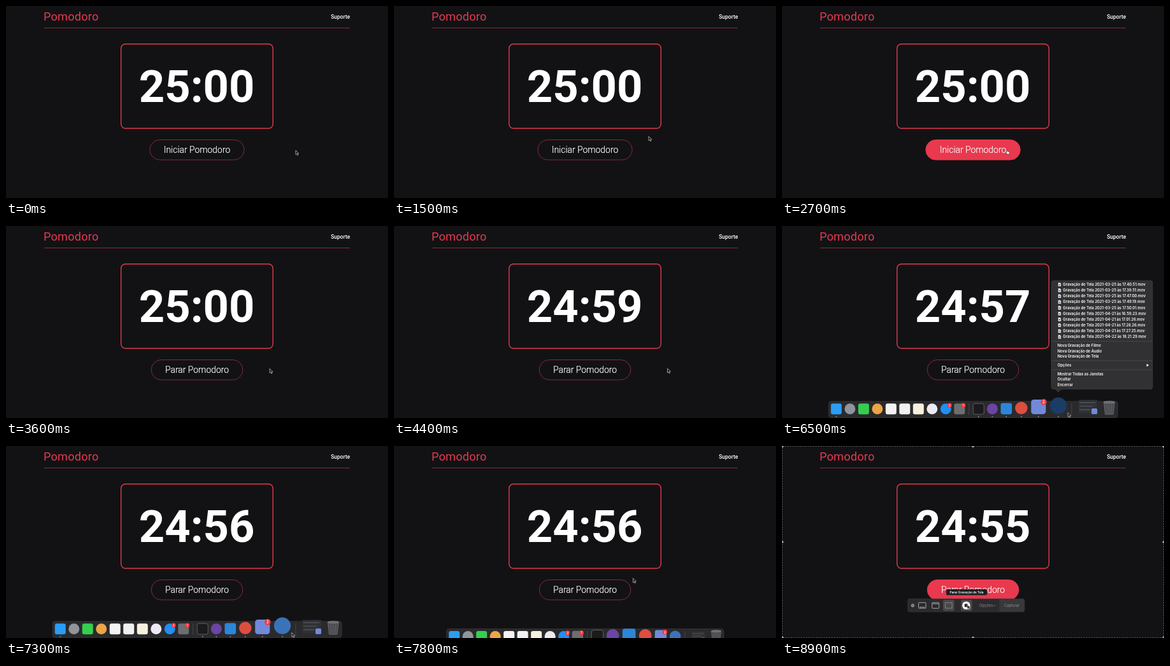
An HTML page for the animation above (9 s loop, 600x302 px).

```html
<!DOCTYPE html>
<html lang="pt">
<head>
<meta charset="utf-8">
<title>Pomodoro</title>
<style>
  html, body { margin: 0; width: 100%; height: 100%; overflow: hidden; background: #121214; }
  svg { display: block; width: 100vw; height: 100vh; }
  text { fill: #fff; font-family: Roboto, Arial, sans-serif; }
  .ui text { font: 600 5.83px Inter, Roboto, sans-serif; }
  .ui .tip { font-size: 5.6px; font-weight: 400; }
  .ui .small { font-size: 4.75px; }
  .ui .badge { font-size: 4.6px; }
  .ui .dim { fill: #8b8b8d; font-weight: 400; }
  .mid { text-anchor: middle; }
</style>
</head>
<body>
<svg id="stage" viewBox="0 0 600 302" xmlns="http://www.w3.org/2000/svg">
  <rect width="600" height="302" fill="#121214"/>
  <text x="59" y="22.9" font-size="18" letter-spacing=".3" style="fill:#e63950">Pomodoro</text>
  <text x="540.3" y="19.8" font-size="8.5" font-weight="500" text-anchor="end">Suporte</text>
  <path d="M60 34.5H540" stroke="#862a38"/>
  <rect x="180.7" y="59.7" width="238.6" height="132.8" rx="7" fill="none" stroke="#e03a4e" stroke-width="1.4"/>
  <text id="clock" class="mid" x="299.6" y="150.5" font-size="70.6" font-weight="700"></text>
  <rect id="button" y="210.5" height="31.5" rx="15.7" fill="#e8394f"/>
  <text id="label" class="mid" x="300" y="231.2" font-size="13.9" font-weight="300" stroke="#fff" stroke-width=".2"></text>

  <g id="dock" class="ui"></g>

  <g id="tooltip" class="ui">
    <path d="M410.5 252.5h54a2 2 0 0 1 2 2v7a2 2 0 0 1-2 2H440l-2.500 2.800-2.500-2.800h-24.500a2 2 0 0 1-2-2v-7a2 2 0 0 1 2-2z" fill="#2a2a2c" stroke="#505052" stroke-width=".5"/>
    <text class="mid tip" x="437.5" y="260">FieldReel Viewer</text>
  </g>

  <g id="menu" class="ui">
    <path d="M426 86h153a3 3 0 0 1 3 3v164.5a3 3 0 0 1-3 3H439l-5 4.500-5-4.500h-3a3 3 0 0 1-3-3V89a3 3 0 0 1 3-3z" fill="#313133" stroke="#4c4c4e" stroke-width=".5"/>
    <path d="M572.7 216.8l3.600 2.200-3.600 2.200z" fill="#fff"/>
  </g>

  <g id="capture" class="ui">
    <rect x=".5" y=".5" width="599" height="301" fill="none" stroke="#8a8a8c" stroke-width=".7" stroke-dasharray="2 2"/>
    <g id="handles" fill="#a5a5a7"></g>
    <rect x="197.5" y="240.3" width="183.5" height="20.7" rx="3" fill="#2b2b2d" stroke="#3d3d3f" stroke-width=".5"/>
    <rect x="341.5" y="240.5" width="39.3" height="20.3" rx="2.5" fill="#38383a"/>
    <rect x="253" y="242" width="17.5" height="17.5" rx="2" fill="#49494b"/>
    <rect x="281" y="242" width="17.5" height="17.5" rx="2" fill="#49494b"/>
    <circle cx="205.3" cy="250.8" r="2.6" fill="#98989a"/>
    <path d="M204.3 249.8l2 2m0-2l-2 2" stroke="#2b2b2d" stroke-width=".6"/>
    <g fill="none" stroke="#b4b4b6" stroke-width=".9">
      <rect x="214.5" y="246.3" width="11.5" height="9" rx="1"/>
      <path d="M216 253.5h8.500"/>
      <rect x="235.7" y="246.3" width="11" height="9" rx="1"/>
      <path d="M236 248.2h10.500"/>
      <rect x="256.5" y="246.5" width="10.5" height="8.6" stroke-dasharray="1.5 1"/>
    </g>
    <circle cx="289.3" cy="250.8" r="6.3" fill="#fff"/>
    <rect x="286.7" y="248.3" width="5" height="5" rx=".8" fill="#29292b"/>
    <text class="dim" x="310" y="252.9">Opções</text>
    <path d="M332.3 250.3l1.600 1.600 1.600-1.600" fill="none" stroke="#8b8b8d" stroke-width=".7"/>
    <text class="mid dim" x="361" y="252.9">Capturar</text>
    <rect x="258" y="225.5" width="64" height="9" rx="1.8" fill="#1d1d1f" stroke="#414143" stroke-width=".5"/>
    <text class="mid small" x="290" y="231.7">Parar Gravação de Tela</text>
  </g>

  <path id="arrow" d="M0 0v6.800l1.600-1.500 1.100 2.500 1.200-.5-1.100-2.400h2.100z" fill="#111" stroke="#ddd" stroke-width=".65"/>
  <path id="hand" d="M1 .3q.7-.4 1 .4l.5 2 2.400.6q1 .3.8 1.300l-.4 2.400h-3L.2 4.700q-.4-.8.5-.6l.7.3z" fill="#fff" stroke="#222" stroke-width=".5"/>
</svg>
<script>
const LOOP = 9000, CLICK = 3100, MENU_OPEN = 6300, MENU_SHUT = 7300, CAPTURE = 8300;
const $ = id => document.getElementById(id);
const set = (el, attrs) => { for (const k in attrs) el.setAttribute(k, attrs[k]); return el; };
const add = (parent, tag, attrs = {}, text = '') => {
  const el = set(document.createElementNS('http://www.w3.org/2000/svg', tag), attrs);
  el.textContent = text;
  return parent.appendChild(el);
};
const show = (el, on) => el.setAttribute('visibility', on ? 'visible' : 'hidden');
const within = (t, a, b) => t >= a && t < b;
const progress = (t, a, b) => Math.min(1, Math.max(0, (t - a) / (b - a)));
const smooth = p => p * p * (3 - 2 * p);

// Pointer moves: from, until, x, y
const MOVES = [
  [100, 900, 400, 205], [2100, 2600, 351.5, 226], [CLICK, 3800, 429.5, 224], [5100, 5500, 443, 303],
  [6250, 6450, 449, 293.5], [7400, 7800, 375.5, 208], [7800, 8500, 291, 249.5]
];
function pointer(t) {
  let x = 455, y = 227;
  for (const [from, until, toX, toY] of MOVES) {
    const p = smooth(progress(t, from, until));
    x += (toX - x) * p;
    y += (toY - y) * p;
  }
  return [x, y];
}

const buttonWidth = t => t < CLICK ? 148.4 : 143.6;
function overButton(t) {
  const [x, y] = pointer(t);
  return Math.abs(x - 300) < buttonWidth(t) / 2 && Math.abs(y - 226.2) < 15.8;
}
// The fill fades over 200 ms and stays as it was once the capture bar covers the page.
function hoverLevel(t) {
  const now = Math.min(t, CAPTURE), steps = 20;
  let sum = 0;
  for (let i = 0; i < steps; i++) sum += overButton(now - i * 200 / steps);
  return sum / steps;
}

// Dock icons: colour, round, badge
const ICONS = [
  ['#2a9df4'], ['#8f959b', 1], ['#35cf50'], ['#eda447', 1], ['#f4f2f2'], ['#f1f1f1'], ['#f6f1de'],
  ['#eeeaf3', 1], ['#1f8ff0', 1, '2'], ['#6c6e71', 0, '1'], ['#1b1b1d'], ['#6b44a4', 1],
  ['#2c86d8'], ['#dc4e40', 1], ['#7289da', 0, '2'], ['#3b73b9', 1]
];
const CELL = 21.5, WIDE = 34, GAP = 8.5, DEPTH = 30;

const dock = $('dock');
const shelf = add(dock, 'rect', { height: 25.7, rx: 4, fill: '#2a2a2d', stroke: '#434346', 'stroke-width': .5 });
const slots = ICONS.map(([fill, round, badge], i) => {
  const g = add(dock, 'g');
  add(g, 'rect', { x: -8.5, y: -17.5, width: 17, height: 17, rx: round ? 8.5 : 3.2, fill });
  if (badge) {
    add(g, 'circle', { cx: 6, cy: -14.6, r: 3.5, fill: '#f03a3e' });
    add(g, 'text', { x: 6, y: -12.9, class: 'mid badge' }, badge);
  }
  const dot = i === 0 || i > 9 ? add(dock, 'circle', { r: .8, fill: '#c8c8ca' }) : null;
  return { g, dot, base: CELL };
});
const player = slots[15].g.firstChild;
set(slots[10].g.firstChild, { stroke: '#77777a', 'stroke-width': .7 });

const shot = add(dock, 'g');
add(shot, 'rect', { x: -10.5, y: -16.5, width: 21, height: 15, fill: '#2f3135' });
add(shot, 'path', { d: 'M-9.5-13.5h18M-9.5-9.5h15M-9.5-5.5h12', stroke: '#505359' });
add(shot, 'rect', { x: 4, y: -7, width: 6.5, height: 6.5, rx: 1.3, fill: '#7289da' });
const bin = add(dock, 'g');
add(bin, 'path', { d: 'M-7.5-17.5h15l-2 17h-11z', fill: '#4b4d50', stroke: '#7e8083', 'stroke-width': .6 });
add(bin, 'ellipse', { cy: -17.3, rx: 7.6, ry: 1.5, fill: '#67696c', stroke: '#9a9c9f', 'stroke-width': .5 });
add(bin, 'path', { d: 'M-3.5-14l1 12M0-14v12M3.5-14l-1 12', stroke: '#66686b', 'stroke-width': .6 });
slots.push({ g: shot, base: WIDE }, { g: bin, base: CELL });
for (const i of [10, 16]) slots[i].divider = add(dock, 'path', { stroke: '#5a5a5d', 'stroke-width': .6 });

// Lays the cells out around the middle of the stage and returns their centres.
function layOut(widths) {
  const total = widths.reduce((a, b) => a + b) + 2 * GAP;
  let x = 300.3 - total / 2;
  const centres = widths.map((w, i) => {
    if (slots[i].divider) x += GAP;
    x += w;
    return x - w / 2;
  });
  return { total, centres };
}
const rest = layOut(slots.map(s => s.base)).centres;

function drawDock(t) {
  const rise = 1 - (1 - progress(t, 5350, 5850)) ** 2;
  const level = rise - progress(t, 7550, 7950) ** 2;
  dock.style.display = level > 0 ? '' : 'none';
  if (level <= 0) return;
  const drop = DEPTH * (1 - level);
  const focus = pointer(t)[0] - 6;
  const extra = rest.map(x => 12.3 * level ** 2 * Math.exp(-(((x - focus) / 45) ** 2)));
  const { total, centres } = layOut(slots.map((s, i) => s.base + extra[i]));
  set(shelf, { x: 299 - total / 2, y: 275.7 + drop, width: total + 2.6 });
  slots.forEach(({ g, dot, divider, base }, i) => {
    const x = centres[i];
    set(g, { transform: `translate(${x} ${296.7 + drop}) scale(${1 + extra[i] / CELL})` });
    if (dot) set(dot, { cx: x, cy: 299.7 + drop });
    if (divider) set(divider, { d: `M${x - (base + extra[i] + GAP) / 2} ${279 + drop}v18` });
  });
  player.setAttribute('fill', within(t, MENU_OPEN, MENU_SHUT) ? '#1a3c66' : '#3b73b9');
}

const FILES = [
  '03-25 às 17.40.51', '03-25 às 17.39.51', '03-25 às 17.47.00', '03-25 às 17.49.19', '03-25 às 17.50.01',
  '04-21 às 16.59.23', '04-21 às 17.01.26', '04-21 às 17.26.26', '04-21 às 17.27.25', '04-22 às 18.21.29'
].map(stamp => `Gravação de Tela 2021-${stamp}.mov`);
const SECTIONS = [
  FILES, ['Nova Gravação de Filme', 'Nova Gravação de Áudio', 'Nova Gravação de Tela'],
  ['Opções'], ['Mostrar Todas as Janelas', 'Ocultar', 'Encerrar']
];
function buildMenu(menu) {
  let y = 85;
  for (const section of SECTIONS) {
    const files = section === FILES;
    if (!files) {
      y += 7;
      add(menu, 'path', { d: `M423 ${y}h159`, stroke: '#4e4e50', 'stroke-width': .8 });
    }
    section.forEach((name, i) => {
      y += i === 0 ? 7 : files ? 9.15 : 8.3;
      add(menu, 'text', { x: files ? 441.3 : 432.7, y: y + 2 }, name);
      if (!files) return;
      add(menu, 'path', { d: `M433.8 ${y - 2.8}h3l1.400 1.400v4.200h-4.400z`, fill: '#ececee' });
      add(menu, 'rect', { x: 434.8, y: y - .6, width: 2.4, height: 2, fill: '#55759f' });
    });
  }
}
buildMenu($('menu'));

for (const x of [.8, 300, 599.2])
  for (const y of [.8, 151, 301.2])
    if (x !== 300 || y !== 151) add($('handles'), 'circle', { cx: x, cy: y, r: 1.7 });

function draw(t) {
  const passed = Math.max(0, Math.floor((t - CLICK) / 1000));
  $('clock').textContent = passed ? `24:${60 - passed}` : '25:00';
  $('label').textContent = t < CLICK ? 'Iniciar Pomodoro' : 'Parar Pomodoro';
  const hover = hoverLevel(t);
  const width = buttonWidth(t);
  set($('button'), { x: 300 - width / 2, width, 'fill-opacity': hover, stroke: hover > .5 ? '#e8394f' : '#862a38' });

  drawDock(t);
  show($('tooltip'), within(t, 5600, MENU_OPEN));
  show($('menu'), within(t, MENU_OPEN, MENU_SHUT));
  show($('capture'), t >= CAPTURE);

  const [x, y] = pointer(t);
  const pointing = t < CAPTURE && overButton(t);
  show($('arrow'), !pointing);
  show($('hand'), pointing);
  set($(pointing ? 'hand' : 'arrow'), { transform: `translate(${x} ${y})` });
}

const start = performance.now();
function frame() {
  draw((performance.now() - start) % LOOP);
  requestAnimationFrame(frame);
}
frame();
</script>
</body>
</html>
```
